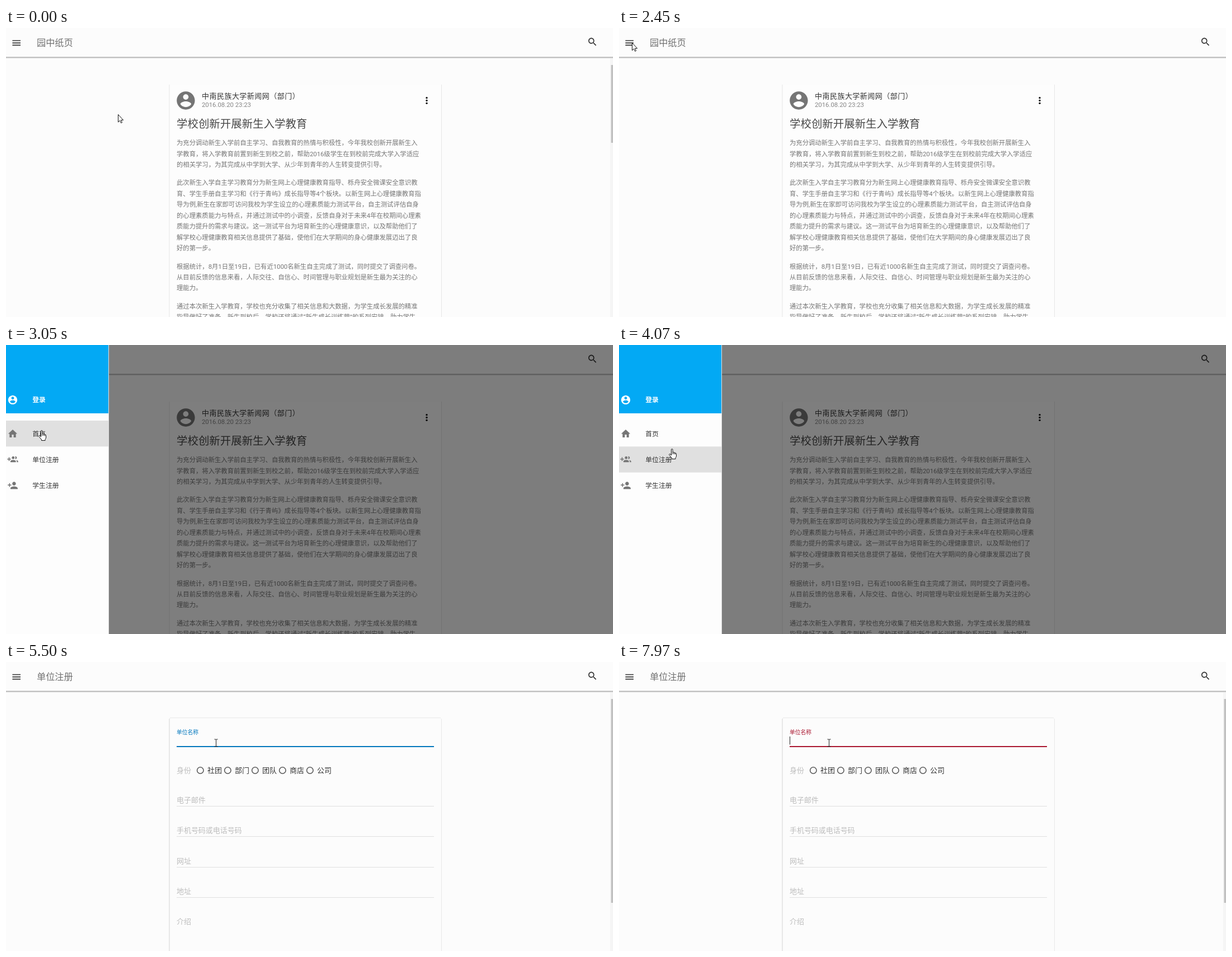
Recreate the animation shown at these times as an HTML page. Size 1085x516 px, loop 8 s.

```html
<!DOCTYPE html>
<html lang="zh-CN">
<head>
<meta charset="utf-8">
<style>
html, body { margin: 0; width: 100%; height: 100%; overflow: hidden; background: #fcfcfc; }
svg { display: block; }
text { font-family: Roboto, "Noto Sans CJK SC", "Noto Sans CJK", sans-serif; white-space: pre; }
</style>
</head>
<body>
<svg id="stage" width="1085" height="516" viewBox="0 0 1085 516"></svg>
<script>
const U = 0.81; // page zoom
const LOOP = 8000;

const ICONS = {
  menu: 'M3 18h18v-2H3v2zm0-5h18v-2H3v2zm0-7v2h18V6H3z',
  search: 'M15.5 14h-.79l-.28-.27C15.41 12.59 16 11.11 16 9.5 16 5.91 13.09 3 9.5 3S3 5.91 3 9.5 5.91 16 9.5 16c1.61 0 3.09-.59 4.23-1.57l.27.28v.79l5 4.99L20.49 19l-4.99-5zm-6 0C7.01 14 5 11.99 5 9.5S7.01 5 9.5 5 14 7.01 14 9.5 11.99 14 9.5 14z',
  account: 'M12 2C6.48 2 2 6.48 2 12s4.48 10 10 10 10-4.48 10-10S17.52 2 12 2zm0 3c1.66 0 3 1.34 3 3s-1.34 3-3 3-3-1.34-3-3 1.34-3 3-3zm0 14.2c-2.5 0-4.71-1.28-6-3.22.03-1.99 4-3.08 6-3.08 1.99 0 5.97 1.09 6 3.08-1.29 1.94-3.5 3.22-6 3.22z',
  home: 'M10 20v-6h4v6h5v-8h3L12 3 2 12h3v8z',
  group: 'M8 10H5V7H3v3H0v2h3v3h2v-3h3v-2zm10 1c1.66 0 2.99-1.34 2.99-3S19.66 5 18 5c-.32 0-.63.05-.91.14.57.81.9 1.79.9 2.86s-.34 2.04-.9 2.86c.28.09.59.14.91.14zm-5 0c1.66 0 2.99-1.34 2.99-3S14.66 5 13 5c-1.66 0-3 1.34-3 3s1.34 3 3 3zm6.62 2.16c.83.73 1.38 1.66 1.38 2.84v2h3v-2c0-1.54-2.37-2.49-4.38-2.84zM13 13c-2 0-6 1-6 3v2h12v-2c0-2-4-3-6-3z',
  person: 'M15 12c2.21 0 4-1.79 4-4s-1.79-4-4-4-4 1.79-4 4 1.79 4 4 4zm-9-2V7H4v3H1v2h3v3h2v-3h3v-2H6zm9 4c-2.67 0-8 1.34-8 4v2h16v-2c0-2.66-5.33-4-8-4z'
};

// Text, rectangles and icons; y of a text is its vertical centre.
const text = (x, y, px, fill, str, more = '') =>
  `<text x="${x}" y="${(y + px * 0.37).toFixed(2)}" font-size="${(px).toFixed(2)}" fill="${fill}" ${more}>${str}</text>`;
const rect = (x, y, w, h, fill, more = '') =>
  `<rect x="${x}" y="${y}" width="${w}" height="${h}" fill="${fill}" ${more}/>`;
const icon = (name, cx, cy, fill, s = U) =>
  `<path transform="translate(${cx - 12 * s} ${cy - 12 * s}) scale(${s})" fill="${fill}" d="${ICONS[name]}"/>`;

const PARAGRAPHS = [
  ['为充分调动新生入学前自主学习、自我教育的热情与积极性，今年我校创新开展新生入',
   '学教育，将入学教育前置到新生到校之前，帮助2016级学生在到校前完成大学入学适应',
   '的相关学习，为其完成从中学到大学、从少年到青年的人生转变提供引导。'],
  ['此次新生入学自主学习教育分为新生网上心理健康教育指导、栎舟安全微课安全意识教',
   '育、学生手册自主学习和《行于青屿》成长指导等4个板块。以新生网上心理健康教育指',
   '导为例,新生在家即可访问我校为学生设立的心理素质能力测试平台，自主测试评估自身',
   '的心理素质能力与特点，并通过测试中的小调查，反馈自身对于未来4年在校期间心理素',
   '质能力提升的需求与建议。这一测试平台为培育新生的心理健康意识，以及帮助他们了',
   '解学校心理健康教育相关信息提供了基础，使他们在大学期间的身心健康发展迈出了良',
   '好的第一步。'],
  ['根据统计，8月1日至19日，已有近1000名新生自主完成了测试，同时提交了调查问卷。',
   '从目前反馈的信息来看，人际交往、自信心、时间管理与职业规划是新生最为关注的心',
   '理能力。'],
  ['通过本次新生入学教育，学校也充分收集了相关信息和大数据，为学生成长发展的精准',
   '指导做好了准备。新生到校后，学校还将通过“新生成长训练营”的系列安排，助力学生']
];

function article() {
  let y = 205, out = '';
  for (const lines of PARAGRAPHS) {
    for (const line of lines) {
      out += text(305, y, 14 * U, '#757575', line);
      y += 24 * U;
    }
    y += 16 * U;
  }
  return out;
}

const heading = str => text(55, 26, 20 * U, '#707070', str, 'font-weight="300"');

const home = () =>
  heading('园中纸页') +
  rect(292, 101, 486, 430, '#fdfdfd') +
  rect(291.5, 101, 1, 430, '#e6e6e6') + rect(778, 101, 1, 430, '#e6e6e6') +
  icon('account', 321.4, 129.5, '#757575', 2 * U) +
  text(350, 121, 16 * U, '#333', '中南民族大学新闻网（部门）', `letter-spacing="${0.64 * U}"`) +
  text(350, 136.3, 14 * U, '#858585', '2016.08.20 23:23') +
  [-1, 0, 1].map(i => `<circle cx="752" cy="${129.5 + i * 4.86}" r="1.7" fill="#111"/>`).join('') +
  text(305, 170.5, 24 * U, '#484848', '学校创新开展新生入学教育', 'font-weight="300"') +
  article();

const form = () =>
  heading('单位注册') +
  rect(291.5, 100.5, 487, 430, '#d4d4d4', 'rx="2"') +
  rect(292.5, 100, 485.5, 430, '#fcfcfc', 'rx="2"') +
  rect(293, 99.2, 484, 1, '#e9e9e9') +
  text(305, 193, 16 * U, '#bdbdbd', '身份') +
  ['社团', '部门', '团队', '商店', '公司'].map((s, i) =>
    `<circle cx="${347.3 + i * 49}" cy="193.5" r="5.7" fill="none" stroke="#5a5a5a" stroke-width="1.6"/>` +
    text(360 + i * 49, 193, 16 * U, '#333', s)).join('') +
  ['', '电子邮件', '手机号码或电话号码', '网址', '地址', '介绍'].map((s, i) => {
    const y = i ? 246.3 + (i - 1) * 54.3 : 140.3;
    return text(305, y, 16 * U, '#bdbdbd', s) + (i < 5 ? rect(305, Math.round(y + 10.7), 460, 1, '#e0e0e0') : '');
  }).join('') +
  rect(305, 150, 460, 2, '#000', 'id="line"') +
  text(305, 140.3, 16 * U, '#bdbdbd', '单位名称', 'id="label"') +
  text(305, 140.3, 16 * U, '#333', '', 'id="value"') +
  rect(305, 133, 1, 14.5, '#222', 'id="caret"') +
  text(305, 162, 12 * U, '#d50000', '单位名称有误，只能包含中文、字母或数字的组合，且以中文或字母开头。', 'id="error"');

const drawer = () =>
  rect(0, 0, 183, 516, '#fdfdfd') + rect(183, 0, 1, 516, '#e0e0e0') +
  rect(0, 0, 183, 122, '#03a9f4') +
  rect(0, 181.3, 183, 46.3, '#e0e0e0', 'id="hover"') +
  [['account', 98, '登录'], ['home', 158.4, '首页'], ['group', 204.5, '单位注册'], ['person', 250.8, '学生注册']]
    .map(([name, y, s], i) => icon(name, 12, y, i ? '#757575' : '#fff') +
      text(47.3, y, 11.8, i ? '#333' : '#fff', s, `font-weight="${i ? 500 : 700}"`)).join('');

const cursors = () => `
  <path id="arrow" fill="#fff" stroke="#111" d="M.5 .5V14L3.5 11.2 5.6 15.6 7.6 14.7 5.6 10.4H9.6Z"/>
  <path id="hand" fill="#fff" stroke="#111" d="M4.5 12V2Q4.5 .5 5.7 .5T7 2V6.5Q9 5.5 9.3 7.2 11.3 6.4 11.5 8.2 13.4 7.6 13.5 9.4V13Q13.5 15 12 16.5V18.5H5.5V17L1 11.5Q0 9.8 1.5 9.5T4.5 12ZM7 6.5V10M9.3 7.2V10M11.5 8.2V10.5"/>
  <path id="beam" fill="none" stroke="#222" d="M-3 -6.5H-1Q0 -6.5 0 -5.5 0 -6.5 1 -6.5H3M0 -6V6M-3 6.5H-1Q0 6.5 0 5.5 0 6.5 1 6.5H3"/>`;

document.getElementById('stage').innerHTML =
  `<defs><linearGradient id="fade" x2="0" y2="1"><stop stop-color="#a6a6a6"/><stop offset=".5" stop-color="#c4c4c4"/><stop offset="1" stop-color="#fcfcfc"/></linearGradient></defs>` +
  rect(0, 0, 1085, 516, '#fcfcfc') +
  rect(0, 51.6, 1085, 3, 'url(#fade)') +
  icon('menu', 18.7, 26.6, '#333') +
  icon('search', 1048.3, 24.9, '#333') +
  `<g id="home">${home()}</g><g id="form">${form()}</g>` +
  `<g id="scroll">${rect(1080, 54, 5, 462, '#f5f5f5')}${rect(1081.5, 66, 3.5, 139, '#c1c1c1', 'id="thumb"')}</g>` +
  rect(0, 0, 1085, 516, '#000', 'id="shade"') +
  `<g id="drawer">${drawer()}</g>` + cursors();

// Timelines: each entry holds from its time until the next one.
const CURSOR = [
  [0, 'arrow', 200, 154], [500, 'arrow', 160, 131], [620, 'arrow', 95, 94], [740, 'arrow', 54, 72],
  [890, 'arrow', 38, 57], [1010, 'hand', 21, 43], [1160, 'hand', 20, 36], [1280, 'hand', 19, 31],
  [1560, 'hand', 18, 28], [1710, 'hand', 18, 27], [2330, 'arrow', 23, 26], [2810, 'arrow', 29, 54],
  [2930, 'arrow', 44, 108], [3050, 'hand', 58, 152], [3170, 'hand', 70, 195], [3290, 'hand', 72, 208],
  [3820, 'hand', 73, 208], [4070, 'hand', 89, 185], [4220, 'arrow', 141, 168], [4340, 'arrow', 210, 154],
  [4460, 'beam', 312, 146], [4580, 'beam', 375, 145], [4730, 'beam', 375.5, 144.5]
];
// Drawer offset and shade opacity
const SLIDE = [[0, null, 0], [2570, -16, 0.46], [2690, -3, 0.49], [2810, 0, 0.5], [4220, null, 0]];
const HOVER = [[0, null], [3050, 135], [3170, 181.3]];
const FLOAT = [[0, 0], [5130, 0.5], [5250, 1]];
const CARET = [[0, false], [4980, true], [5500, false], [6060, true], [6560, false], [6810, true]];
const VALUE = [[0, ''], [6810, 'x'], [7050, 'xi'], [7330, 'xia'], [7730, 'xi'], [7850, 'x'], [7970, '']];
const COLOR = [[0, '#0277bd'], [6810, '#1675ba'], [6930, '#9c2140'], [7050, '#d50000'], [7970, '#aa1730']];

const at = (list, t) => list.findLast(e => e[0] <= t);
const el = id => document.getElementById(id);
const show = (id, on) => el(id).setAttribute('display', on ? 'inline' : 'none');
const set = (id, attrs) => {
  for (const k in attrs) el(id).setAttribute(k, attrs[k]);
};

function draw(t) {
  const onForm = t >= 4220;
  show('home', !onForm);
  show('form', onForm);
  show('scroll', t < 2450 || onForm);
  set('thumb', { height: onForm ? 364 : 139 });

  const [, slide, dim] = at(SLIDE, t), hover = at(HOVER, t)[1];
  set('shade', { opacity: dim });
  show('drawer', slide !== null);
  set('drawer', { transform: `translate(${slide || 0})` });
  show('hover', hover !== null);
  set('hover', { y: hover || 0 });

  const value = at(VALUE, t)[1], p = at(FLOAT, t)[1], color = at(COLOR, t)[1];
  const size = (16 - 4 * p) * U;
  el('value').textContent = value;
  set('label', { y: 140.3 - 15.3 * p + size * 0.37, 'font-size': size, fill: p ? color : '#bdbdbd' });
  set('line', { x: 535 - 230 * p, width: 460 * p, fill: color });
  set('caret', { x: 305 + (value && Math.round(el('value').getComputedTextLength() + 0.4)) });
  show('caret', at(CARET, t)[1]);
  show('error', value !== '');

  const [, kind, x, y] = at(CURSOR, t);
  for (const id of ['arrow', 'hand', 'beam']) show(id, id === kind);
  set(kind, { transform: `translate(${x} ${y})` });
}

const start = performance.now();
function tick() {
  draw((performance.now() - start) % LOOP);
  requestAnimationFrame(tick);
}
tick();
</script>
</body>
</html>
```
